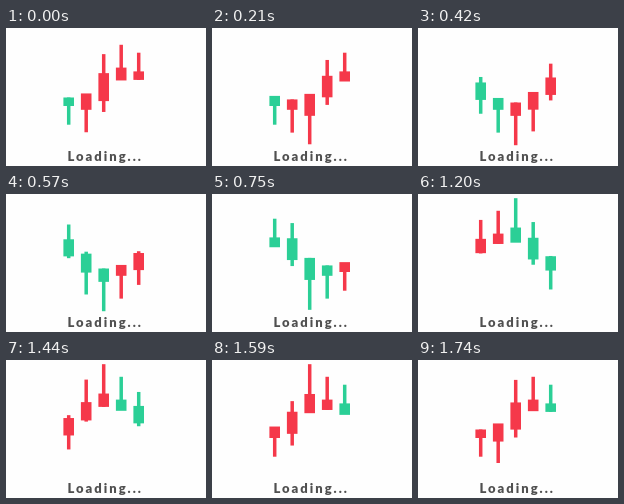
Animation of 200 by 138 pixels, one loop 1.77 s. Source, as an HTML page:

```html
<!DOCTYPE html>
<html lang="en">
<head>
<meta charset="utf-8">
<title>Loading</title>
<style>
  html, body { margin: 0; width: 100%; height: 100%; overflow: hidden; background: #fefefe; }
  svg { display: block; width: 100vw; height: 100vh; }
  text { font: 900 13px Lato, "Open Sans", sans-serif; letter-spacing: 2px; fill: #505050; }
</style>
</head>
<body>
<svg viewBox="0 0 200 138">
  <g id="chart"></g>
  <text x="61.4" y="133.4">Loading...</text>
</svg>
<script>
const LOOP = 1770, STEP = 30, LEG = LOOP / 2;
const GREEN = '#2bcf96', RED = '#f5384a';
const COUNT = 5, FIRST_X = 62.7, GAP = 17.5, MID_Y = 60.7;
const BODY_WIDTH = 10.6, WICK_WIDTH = 3.5;

// Distances from the middle line for the outermost candle at rest.
const WICK_END = 36, BODY_FAR = 17.3, BODY_NEAR = 8.8;
// Candles grow toward the centre.
const SCALES = [1, 1.22, 1.57];

// Share of a leg in which each edge moves; the front edge faces the direction of travel.
const timing = {
  wickFront: [.2, .78], bodyFront: [.14, .75],
  bodyBack: [.25, .95], wickBack: [.3, .83]
};

const chart = document.getElementById('chart');
const mod = (a, n) => ((a % n) + n) % n;

function ease(u, [start, end]) {
  const p = Math.min(1, Math.max(0, (u - start) / (end - start)));
  return (1 - Math.cos(Math.PI * p)) / 2;
}

function addRect(x, width) {
  const rect = document.createElementNS('http://www.w3.org/2000/svg', 'rect');
  rect.setAttribute('x', x - width / 2);
  rect.setAttribute('width', width);
  return chart.appendChild(rect);
}

function place(rect, a, b, color) {
  rect.setAttribute('y', Math.min(a, b));
  rect.setAttribute('height', Math.abs(a - b));
  rect.setAttribute('fill', color);
}

const candles = Array.from({ length: COUNT }, (_, i) => {
  const x = FIRST_X + GAP * i;
  return {
    scale: SCALES[Math.min(i, COUNT - 1 - i)],
    delay: i * LOOP / 8,
    wick: addRect(x, WICK_WIDTH),
    body: addRect(x, BODY_WIDTH)
  };
});

function drawCandle({ scale, delay, wick, body }, time) {
  const phase = mod(time - delay, LOOP);
  const rising = phase < LEG;
  const u = phase % LEG / LEG;
  const direction = rising ? -1 : 1;
  const color = rising ? GREEN : RED;
  const edge = (from, to, span) =>
    MID_Y + direction * scale * (from + (to - from) * ease(u, span));

  place(wick, edge(-BODY_NEAR, WICK_END, timing.wickFront),
    edge(-WICK_END, BODY_NEAR, timing.wickBack), color);
  place(body, edge(-BODY_NEAR, BODY_FAR, timing.bodyFront),
    edge(-BODY_FAR, BODY_NEAR, timing.bodyBack), color);
}

function draw(time) {
  const t = Math.floor(mod(time, LOOP) / STEP) * STEP;
  for (const candle of candles) drawCandle(candle, t);
}

const began = performance.now();
function tick() {
  draw(performance.now() - began);
  requestAnimationFrame(tick);
}
tick();
</script>
</body>
</html>
```
